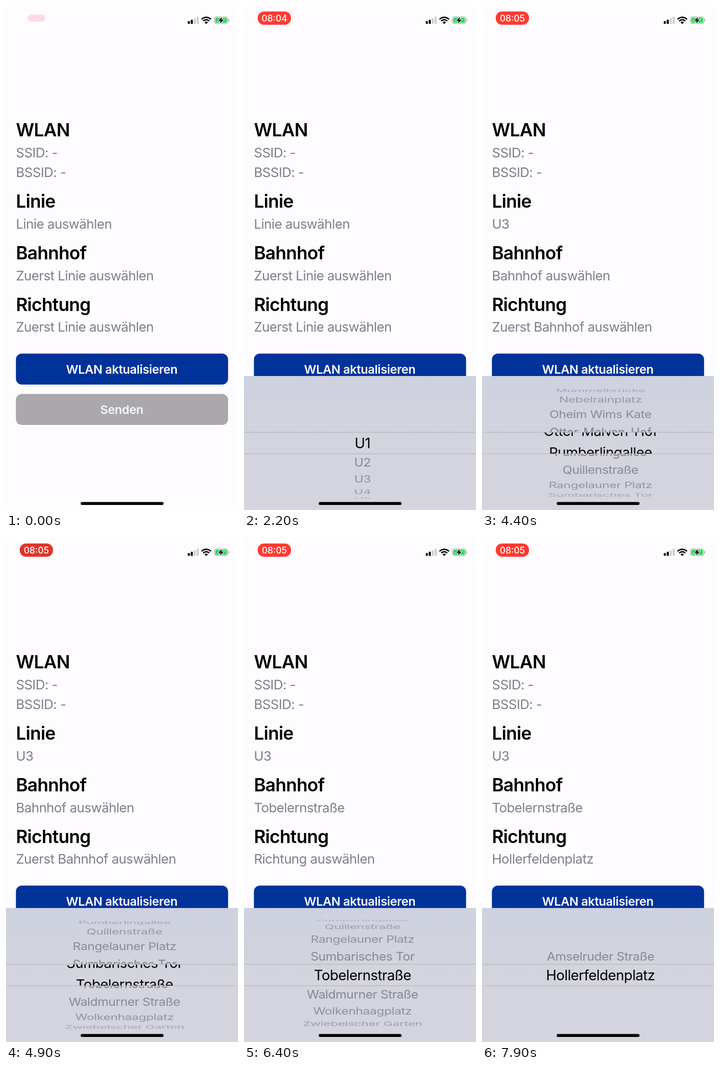
An HTML page with a canvas for the animation above (8000 ms loop, 508 px wide and 1102 px high).

```html
<!DOCTYPE html>
<html lang="de">
<head>
<meta charset="utf-8">
<title>WLAN</title>
<style>
html, body { margin: 0; width: 100%; height: 100%; overflow: hidden; background: #fefcff; }
canvas { display: block; width: 508px; height: 1102px; }
</style>
</head>
<body>
<canvas id="stage"></canvas>
<script>
const W = 508, H = 1102, LOOP = 8000, STEP = 100;
const canvas = document.getElementById('stage');
const ctx = canvas.getContext('2d');
const dpr = window.devicePixelRatio || 1;
canvas.width = W * dpr;
canvas.height = H * dpr;

const FAMILY = 'Inter, Roboto, sans-serif';
const STYLES = {
  title:  { font: `600 39.4px ${FAMILY}`, track: '-0.8px' },
  body:   { font: `400 28.9px ${FAMILY}`, track: '-0.59px' },
  button: { font: `600 26.3px ${FAMILY}`, track: '-0.35px' },
  clock:  { font: `500 19.5px ${FAMILY}`, track: '0px' },
  wheel:  { font: `400 30.8px ${FAMILY}`, track: '-0.55px' }
};

const LINES = ['U1', 'U2', 'U3', 'U4', 'U5', 'U6', 'U7', 'U8', 'U9'];
const STATIONS = [
  'Amselruder Straße', 'Brombeertalplatz', 'Dulmostraße', 'Elvern-Dorf',
  'Fabelruhener Platz', 'Farnkrautweiher', 'Glimmerbogen', 'Grummler Bahnhof',
  'Hagelisches Tor', 'Hainbüchler Platz', 'Hollerfeldenplatz', 'Kumbelner Tor',
  'Krautige Senke', 'Kieselfinkstraße', 'Mummelbrücke', 'Nebelrainplatz',
  'Oheim Wims Kate', 'Otter-Malven-Hof', 'Pumberlingallee', 'Quillenstraße',
  'Rangelauner Platz', 'Sumbarisches Tor', 'Tobelernstraße', 'Waldmurner Straße',
  'Wolkenhaagplatz', 'Zwiebelscher Garten'
];
const ENDS = [STATIONS[0], STATIONS[10]];

const clamp = v => Math.min(1, Math.max(0, v));
const part = (t, from, to) => clamp((t - from) / (to - from));
const easeOut = (u, n) => 1 - Math.pow(1 - u, n);
const smooth = u => u * u * (3 - 2 * u);

function text(str, x, y, style, color, align = 'left') {
  ctx.font = STYLES[style].font;
  ctx.letterSpacing = STYLES[style].track;
  ctx.textAlign = align;
  ctx.fillStyle = color;
  ctx.fillText(str, x, y);
}

function box(x, y, w, h, r, color) {
  ctx.fillStyle = color;
  ctx.beginPath();
  ctx.roundRect(x, y, w, h, r);
  ctx.fill();
}

function clipped(x, y, w, h, draw) {
  ctx.save();
  ctx.beginPath();
  ctx.rect(x, y, w, h);
  ctx.clip();
  draw();
  ctx.restore();
}

function drawClock(t) {
  const grow = easeOut(part(t, 0, 300), 2);
  const k = 0.53 + 0.47 * grow;
  const dark = Math.max(0, Math.cos((t - 4900) * Math.PI / 1000)) * part(t, 300, 700);
  const mix = (a, b) => Math.round(a + (b - a) * dark);
  ctx.save();
  ctx.globalAlpha = 0.16 + 0.84 * grow;
  ctx.translate(66.5, 26.5);
  ctx.scale(k, k);
  const red = t < 100 ? '#ef2f66' : `rgb(${mix(255, 224)},${mix(59, 54)},${mix(48, 44)})`;
  box(-36.5, -14.5, 73, 29, 14, red);
  ctx.globalAlpha = grow;
  text(t < 3000 ? '08:04' : '08:05', 0, 7.1, 'clock', '#fff', 'center');
  ctx.restore();
}

function drawStatus() {
  for (let i = 0; i < 4; i++) {
    const h = [6, 9, 12, 15.5][i];
    box(398 + i * 6.5, 39 - h, 4.5, h, 1, i < 2 ? '#000' : '#cfcdd0');
  }

  // Wi-Fi fan
  ctx.save();
  ctx.beginPath();
  ctx.moveTo(438.5, 39.5);
  ctx.lineTo(424.5, 25.5);
  ctx.lineTo(424.5, 18);
  ctx.lineTo(452.5, 18);
  ctx.lineTo(452.5, 25.5);
  ctx.closePath();
  ctx.clip();
  ctx.strokeStyle = ctx.fillStyle = '#000';
  ctx.lineWidth = 3;
  for (const r of [8.7, 14]) {
    ctx.beginPath();
    ctx.arc(438.5, 38.7, r, Math.PI, 2 * Math.PI);
    ctx.stroke();
  }
  ctx.beginPath();
  ctx.arc(438.5, 38.7, 4.6, 0, 2 * Math.PI);
  ctx.fill();
  ctx.restore();

  // battery
  ctx.strokeStyle = '#a3a2a5';
  ctx.lineWidth = 1.3;
  ctx.beginPath();
  ctx.roundRect(456.3, 23.6, 29.4, 15, 4.6);
  ctx.stroke();
  box(458.2, 25.5, 25.6, 11.2, 2.8, '#35d45f');
  box(487, 28.6, 1.6, 5, [0, 1.6, 1.6, 0], '#a3a2a5');
  ctx.beginPath();
  ctx.moveTo(473, 23.8);
  ctx.lineTo(464.6, 32.4);
  ctx.lineTo(470, 32.4);
  ctx.lineTo(468.4, 38.6);
  ctx.lineTo(477, 29.8);
  ctx.lineTo(471.6, 29.8);
  ctx.closePath();
  ctx.strokeStyle = '#fff';
  ctx.lineWidth = 2.2;
  ctx.stroke();
  ctx.fillStyle = '#000';
  ctx.fill();
}

function drawForm(t) {
  const line = t >= 3050, station = t >= 5600, end = t >= 7500;
  const field = (str, y) => text(str, 21.7, y, 'body', '#807f84');
  const title = (str, y) => text(str, 21.7, y, 'title', '#000');

  title('WLAN', 285.3);
  field('SSID: -', 331);
  field('BSSID: -', 374);
  title('Linie', 441.3);
  field(line ? 'U3' : 'Linie auswählen', 487);
  title('Bahnhof', 554.2);
  field(station ? STATIONS[22] : line ? 'Bahnhof auswählen' : 'Zuerst Linie auswählen', 599.6);
  title('Richtung', 667);
  field(end ? ENDS[1] : station ? 'Richtung auswählen'
    : `Zuerst ${line ? 'Bahnhof' : 'Linie'} auswählen`, 712);

  box(21.7, 760, 464.6, 67.7, 13, '#003399');
  text('WLAN aktualisieren', 253.5, 803.6, 'button', '#fff', 'center');
  box(21.7, 848.3, 464.6, 67.7, 13, '#aaa8ab');
  text('Senden', 253.5, 892, 'button', '#f7f6f8', 'center');
}

// Rows sit on a cylinder; the middle band shows them magnified.
const RADIUS = 122, TURN = Math.PI / 9, MID = 956, SMALL = 0.895;

function drawRows(items, pos, band) {
  const size = band ? 1 : SMALL;
  items.forEach((name, i) => {
    const angle = (i - pos) * TURN;
    if (Math.abs(angle) > 1.5) return;
    const c = Math.cos(angle);
    const fade = Math.round(100 * (0.13 + 0.28 * c)) / 100;
    ctx.save();
    ctx.translate(259.5, MID + RADIUS * Math.sin(angle) * (band ? 1.1 : 1));
    ctx.scale(size, size * c);
    text(name, 0, 11.2, 'wheel', band ? '#000' : `rgba(15,15,25,${fade})`, 'center');
    ctx.restore();
  });
}

function wheelState(t) {
  if (t < 3300) return [LINES, 2 * smooth(part(t, 2300, 2900))];
  if (t < 6700) return [STATIONS, 22 * easeOut(part(t, 3850, 5550), 4.1)];
  return [ENDS, smooth(part(t, 6950, 7450))];
}

function drawWheel(t) {
  if (t < 1800) return;
  const [items, pos] = wheelState(t);
  ctx.save();
  ctx.translate(0, 293 * (1 - easeOut(part(t, 1800, 2150), 3)));
  const shade = ctx.createLinearGradient(0, 809, 0, 960);
  shade.addColorStop(0, '#ced2df');
  shade.addColorStop(1, '#d3d4dd');
  ctx.fillStyle = shade;
  ctx.fillRect(0, 809, W, 293);
  clipped(0, 809, W, 123, () => drawRows(items, pos, false));
  clipped(0, 979, W, 123, () => drawRows(items, pos, false));
  clipped(0, 932, W, 47, () => drawRows(items, pos, true));
  ctx.fillStyle = '#acadb4';
  ctx.fillRect(0, 931.5, W, 1);
  ctx.fillRect(0, 978.5, W, 1);
  ctx.restore();
}

function draw(t) {
  ctx.setTransform(dpr, 0, 0, dpr, 0, 0);
  ctx.fillStyle = '#fefcff';
  ctx.fillRect(0, 0, W, H);
  drawClock(t);
  drawStatus();
  drawForm(t);
  drawWheel(t);
  box(163.5, 1084.5, 181.5, 6.6, 3.3, '#000');
}

function tick() {
  const t = performance.now() % LOOP;
  draw(Math.floor(t / STEP) * STEP);
  requestAnimationFrame(tick);
}
tick();
</script>
</body>
</html>
```
